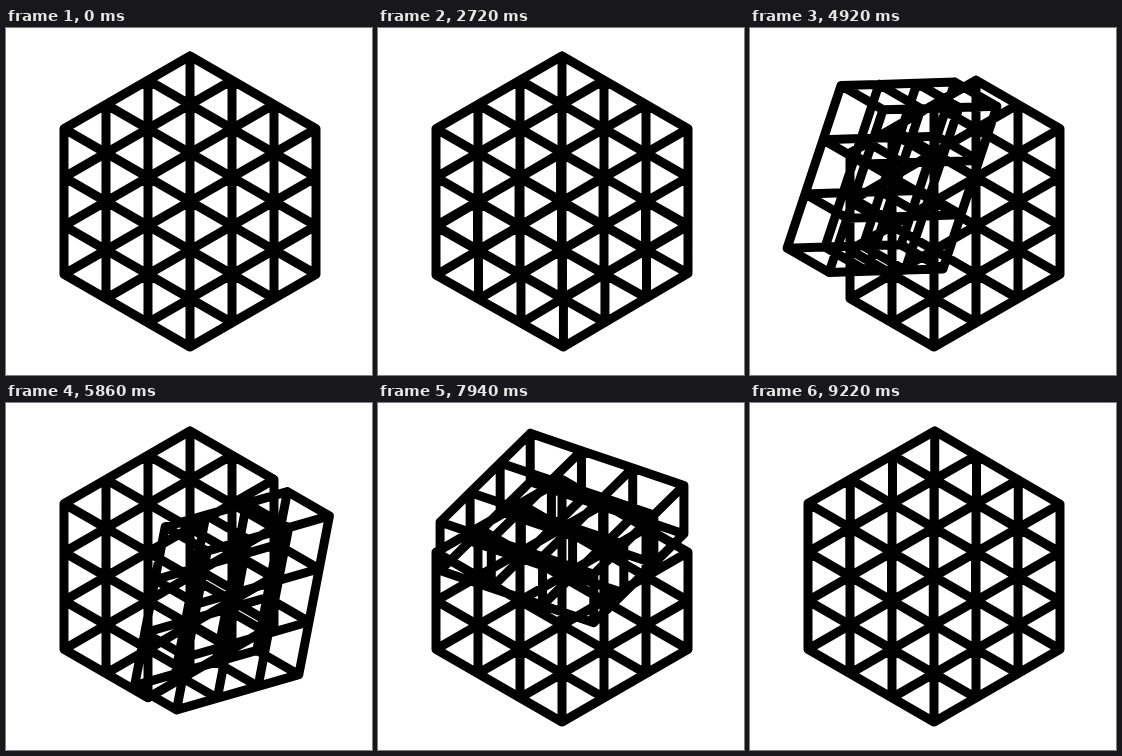
Recreate the animation shown at these times as an HTML page with a canvas. Size 366 px wide and 347 px high, loop 9260 ms.

```html
<!DOCTYPE html>
<html>
<head>
<meta charset="utf-8">
<style>
html, body { margin: 0; width: 100%; height: 100%; overflow: hidden; background: #fff; }
canvas { display: block; }
</style>
</head>
<body>
<canvas id="stage" width="366" height="347"></canvas>
<script>
const ctx = document.getElementById('stage').getContext('2d');
const CELL = 48.5, CX = 184, CY = 173.5, LOOP = 9260;

// [axis, layer, quarter turns, steps]
const MOVES = [
  [1, 1, 2, 40], [1, -1, 1, 20], [0, 1, -1, 20], [0, -1, 1, 20],
  [0, 1, 1, 20], [0, -1, -1, 20], [1, -1, -1, 20], [1, 1, 2, 40]
];

// The first five blocks of 20 steps each end with a short rest.
function stepAt(t) {
  t -= 1000;
  if (t < 0) return 0;
  if (t >= 4300) return 101 + Math.floor((t - 4300) / 40);
  return 20 * Math.floor(t / 860) + Math.min(20, 1 + Math.floor(t % 860 / 40));
}

function poseAt(step) {
  for (const [axis, layer, turns, steps] of MOVES) {
    if (step <= steps) {
      const u = step / steps;
      return { axis, layer, angle: turns * Math.PI / 2 * u * u * (3 - 2 * u) };
    }
    step -= steps;
  }
}

function rotate(v, axis, angle) {
  const j = (axis + 1) % 3, k = (axis + 2) % 3;
  const c = Math.cos(angle), s = Math.sin(angle), r = [...v];
  r[j] = v[j] * c - v[k] * s;
  r[k] = v[j] * s + v[k] * c;
  return r;
}

const project = ([x, y, z]) => [
  CX + (x - z) * CELL * Math.sqrt(3) / 2,
  CY + ((x + z) / 2 - y) * CELL
];

function addCubie(centre, { axis, layer, angle }) {
  const turn = centre[axis] === layer ? angle : 0;
  const corners = Array.from({ length: 8 }, (_, i) =>
    project(rotate(centre.map((c, d) => c + (i >> d & 1) - 0.5), axis, turn)));
  for (let i = 0; i < 8; i++) {
    for (const bit of [1, 2, 4]) {
      if (i & bit) continue;
      ctx.moveTo(...corners[i]);
      ctx.lineTo(...corners[i | bit]);
    }
  }
}

function draw(step) {
  const pose = poseAt(step), range = [-1, 0, 1];
  ctx.fillStyle = '#fff';
  ctx.fillRect(0, 0, 366, 347);
  ctx.lineWidth = 9;
  ctx.lineCap = 'round';
  ctx.beginPath();
  for (const x of range) for (const y of range) for (const z of range) addCubie([x, y, z], pose);
  ctx.stroke();
}

function tick() {
  draw(stepAt(performance.now() % LOOP));
  requestAnimationFrame(tick);
}
tick();
</script>
</body>
</html>
```
